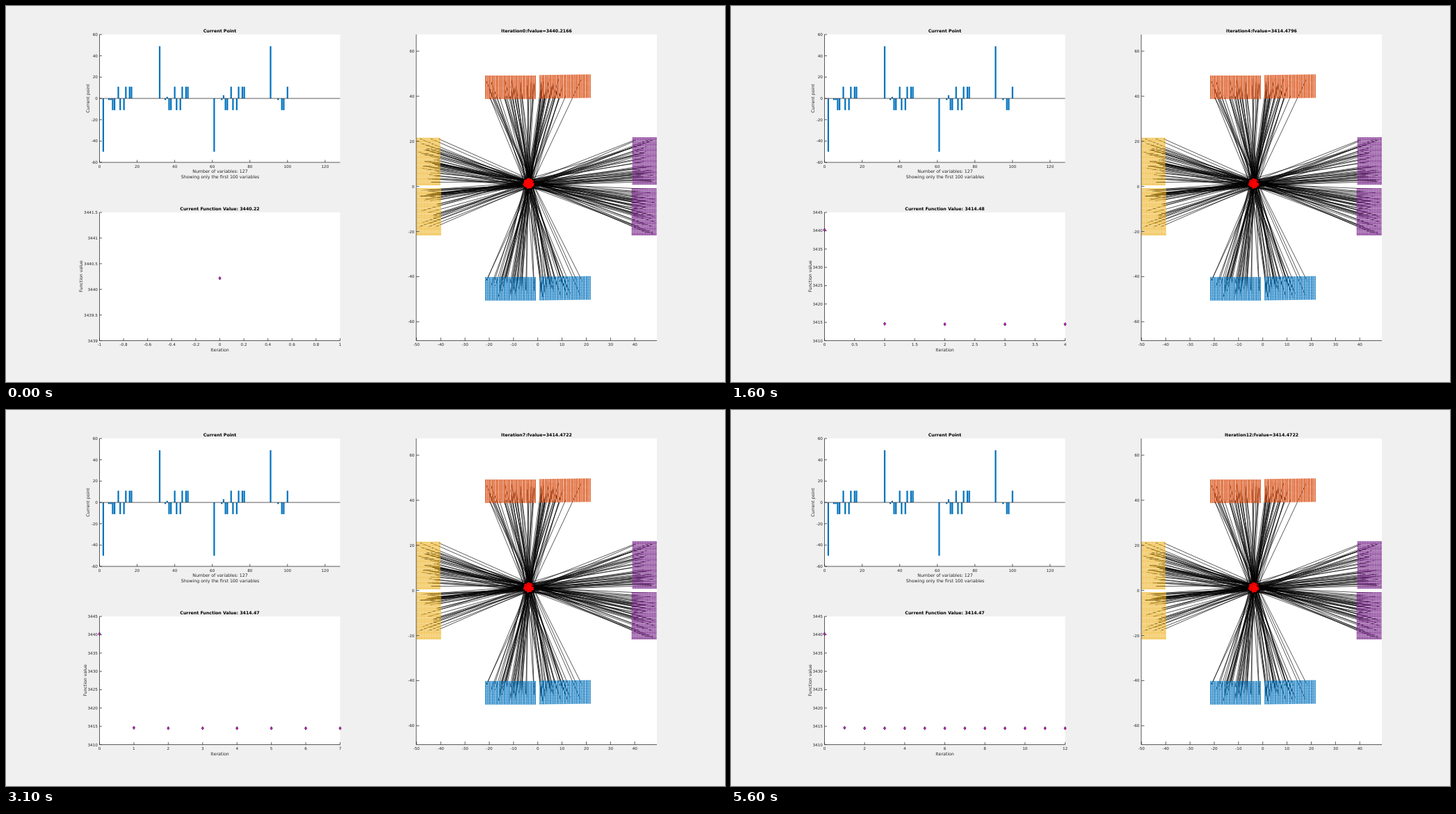
Recreate the animation shown at these times as an HTML page with a canvas. Size 1034 by 541 pixels, loop 6.6 s.

```html
<!DOCTYPE html>
<html>
<head>
<meta charset="utf-8">
<style>
html, body { margin: 0; width: 100%; height: 100%; overflow: hidden; background: #f0f0f0; }
canvas { display: block; }
</style>
</head>
<body>
<canvas id="stage" width="1034" height="541"></canvas>
<script>
const ctx = document.getElementById('stage').getContext('2d');
const LOOP = 6600, INK = '#262626';
const BLUE = '#0072bd', ORANGE = '#d95319', YELLOW = '#edb120', PURPLE = '#7e2f8e';
const CORE = { x: -3.8, y: 1.3, radius: 2.1 };

// detector blocks: colour, x range, y range, tilt, strips run upright?, dot step
const blocks = [
  [ORANGE, -21.4, -1.1, 39, 49, 0, true, .33],
  [ORANGE, 1, 21.5, 39.2, 49.2, .3, true, .33],
  [BLUE, -21.4, -1.1, -50.4, -40.4, 0, true, .42],
  [BLUE, 1, 21.5, -50.3, -40.3, .3, true, .42],
  [YELLOW, -50.1, -40.4, .8, 21.3, 0, false, .5],
  [YELLOW, -49.8, -40.1, -21.4, -1.1, 0, false, .5],
  [PURPLE, 39.2, 49.1, 1.1, 21.5, 0, false, .4],
  [PURPLE, 38.9, 48.8, -21.4, -1.1, 0, false, .4]
];

function random(seed) {
  return () => {
    seed = seed + 0x6d2b79f5 | 0;
    let t = Math.imul(seed ^ seed >>> 15, 1 | seed);
    t = t + Math.imul(t ^ t >>> 7, 61 | t) ^ t;
    return ((t ^ t >>> 14) >>> 0) / 4294967296;
  };
}

// straight rays through a disc, ending inside two opposite blocks
function makeRays(upright, count, spread, seed) {
  const rnd = random(seed), rays = [];
  const depth = () => 9 * rnd();
  const hits = v => Math.abs(v) > 1.1 && Math.abs(v) < 21.3;
  while (rays.length < count) {
    const r = spread * Math.sqrt(rnd()), a = rnd() * 2 * Math.PI;
    const x = CORE.x + r * Math.cos(a), y = CORE.y + r * Math.sin(a);
    const slope = Math.tan((rnd() - .5) * 1.08);
    const u = upright ? y : x, v = upright ? x : y;
    const u1 = -40.3 - depth(), u2 = 39.2 + depth();
    const v1 = v + (u1 - u) * slope, v2 = v + (u2 - u) * slope;
    if (!hits(v1) || !hits(v2)) continue;
    rays.push({ x, y, r, line: upright ? [v1, u1, v2, u2] : [u1, v1, u2, v2] });
  }
  return rays;
}
const fewRays = [...makeRays(true, 66, 2.1, 11), ...makeRays(false, 82, 2.1, 29)];
const manyRays = [...makeRays(true, 450, 3.4, 5), ...makeRays(false, 450, 3.4, 8)];

function text(str, x, y, { size = 6.25, bold = false, align = 'center', color = INK } = {}) {
  ctx.font = `${bold ? 'bold ' : ''}${size}px "DejaVu Sans", sans-serif`;
  ctx.textAlign = align;
  ctx.fillStyle = color;
  ctx.fillText(str, x, y + size * .36);
}
const title = (str, x, y) => text(str, x, y, { bold: true, color: '#000' });

function sideText(str, x, y) {
  ctx.save();
  ctx.translate(x, y);
  ctx.rotate(-Math.PI / 2);
  text(str, 0, 0);
  ctx.restore();
}

function segment(x1, y1, x2, y2) {
  ctx.moveTo(x1, y1);
  ctx.lineTo(x2, y2);
}

function range(from, to, step) {
  const n = Math.round((to - from) / step);
  return Array.from({ length: n + 1 }, (_, i) => +(from + i * step).toFixed(2));
}

function paper(a) {
  ctx.fillStyle = '#fff';
  ctx.fillRect(a.left, a.top, a.right - a.left, a.bottom - a.top);
}

function frame(a, xs, ys) {
  const { left, right, top, bottom, X, Y } = a;
  const tick = .01 * Math.max(right - left, bottom - top);
  ctx.beginPath();
  segment(left, top, left, bottom);
  segment(left, bottom, right, bottom);
  for (const x of xs) segment(X(x), bottom, X(x), bottom - tick);
  for (const y of ys) segment(left, Y(y), left + tick, Y(y));
  ctx.strokeStyle = INK;
  ctx.lineWidth = .75;
  ctx.stroke();
  for (const x of xs) text(x, X(x), bottom + 5.6, { size: 5.68 });
  for (const y of ys) text(y, left - 2.6, Y(y), { size: 5.68, align: 'right' });
}

function axes(left, right, top, bottom, x0, x1, y0, y1) {
  return {
    left, right, top, bottom,
    X: x => left + (x - x0) / (x1 - x0) * (right - left),
    Y: y => bottom - (y - y0) / (y1 - y0) * (bottom - top)
  };
}

function drawBars() {
  const a = axes(134.5, 480.5, 41, 225, 0, 128, -60, 60);
  const bars = [[2, -50], [32, 49], [61, -50], [91, 49], [95, -1.5], [97, -11], [98, -11], [100, 11]];
  const group = [[5, -1.5], [6, -1.5], [7, -11], [8, -11], [10, 11], [11, -11], [13, -11], [14, 11], [16, 11], [17, 11]];
  [0, 30, 60].forEach((base, k) => {
    for (const [i, v] of group) bars.push([base + i, i === 6 ? [-1.5, 1.5, 3][k] : v]);
  });
  paper(a);
  ctx.fillStyle = BLUE;
  for (const [i, v] of bars) ctx.fillRect(a.X(i) - 1.1, a.Y(Math.max(v, 0)), 2.2, Math.abs(v) * 184 / 120);
  frame(a, range(0, 120, 20), range(-60, 60, 20));
  ctx.beginPath();
  segment(a.left, a.Y(0), a.right, a.Y(0));
  ctx.stroke();
  title('Current Point', 307.5, 35.8);
  sideText('Current point', 118, 133);
  text('Number of variables: 127', 308, 238);
  text('Showing only the first 100 variables', 308, 245.4);
}

function valueAt(i) {
  if (i === 0) return 3440.2166;
  if (i === 1) return 3414.6;
  if (i === 2) return 3414.4797;
  if (i < 5) return 3414.4796;
  return i === 5 ? 3414.4723 : 3414.4722;
}

function drawHistory(n) {
  const first = n === 0, end = n === 11 ? 12 : n;
  const [x0, x1] = first ? [-1, 1] : [0, end];
  const [y0, y1] = first ? [3439, 3441.5] : [3410, 3445];
  const step = end < 3 ? .2 : end < 6 ? .5 : end < 11 ? 1 : 2;
  const a = axes(134.5, 480.5, 297, 481.5, x0, x1, y0, y1);
  paper(a);
  frame(a, range(x0, x1, step), range(y0, y1, first ? .5 : 5));
  title('Current Function Value: ' + valueAt(n).toFixed(2), 307.5, 292);
  sideText('Function value', first ? 108 : 113.5, 389);
  text('Iteration', 307.5, 494.5);
  ctx.fillStyle = '#f0f';
  ctx.strokeStyle = '#000';
  ctx.lineWidth = .65;
  for (let i = 0; i <= n; i++) {
    const x = a.X(i), y = a.Y(valueAt(i));
    ctx.beginPath();
    ctx.moveTo(x, y - 2.3);
    ctx.lineTo(x + 1.6, y);
    ctx.lineTo(x, y + 2.3);
    ctx.lineTo(x - 1.6, y);
    ctx.closePath();
    ctx.fill();
    ctx.stroke();
  }
}

function drawBlock([color, x0, x1, y0, y1, tilt, upright, step], { X, Y }, size) {
  const strips = 30, dots = Math.round(10 / step);
  ctx.fillStyle = color;
  for (let i = 0; i < strips; i++) {
    for (let j = 0; j <= dots; j++) {
      const s = i / (strips - 1), d = j / dots;
      const u = upright ? s : d, v = upright ? d : s;
      const x = X(x0 + (x1 - x0) * u), y = Y(y0 + (y1 - y0) * v + tilt * u);
      ctx.fillRect(x - size / 2, y - size / 2, size, size);
    }
  }
}

function drawScene(a, rays, width, dot, red) {
  const { X, Y } = a;
  paper(a);
  ctx.save();
  ctx.beginPath();
  ctx.rect(a.left, a.top, a.right - a.left, a.bottom - a.top);
  ctx.clip();
  ctx.strokeStyle = '#000';
  ctx.lineWidth = width;
  // stroked one by one so that overlaps darken
  for (const { line: [x1, y1, x2, y2] } of rays) {
    ctx.beginPath();
    segment(X(x1), Y(y1), X(x2), Y(y2));
    ctx.stroke();
  }
  for (const b of blocks) drawBlock(b, a, dot);
  ctx.fillStyle = '#f00';
  for (const { x, y, r } of rays) {
    if (r > CORE.radius) continue;
    ctx.beginPath();
    ctx.arc(X(x), Y(y), red, 0, 7);
    ctx.fill();
  }
  ctx.restore();
}

function drawOverview() {
  const a = axes(162.5, 908, 41, 481.5, -84.72, 83.75, -50.4, 49.2);
  drawScene(a, manyRays, .65, 1.5, .65);
  frame(a, range(-80, 80, 20), range(-50, 40, 10));
  title('line3', 535.5, 35.5);
}

function drawIteration(n) {
  drawBars();
  drawHistory(n);
  const a = axes(590, 936, 41, 481.5, -50.1, 49.1, -68.4, 67.4);
  drawScene(a, fewRays, .65, 1.55, n ? .9 : 1.2);
  frame(a, range(-50, 40, 10), range(-60, 60, 20));
  title(`Iteration${n}:fvalue=${valueAt(n).toFixed(4)}`, 763, 35.8);
}

function draw(n) {
  ctx.fillStyle = '#f0f0f0';
  ctx.fillRect(0, 0, 1034, 541);
  ctx.textRendering = 'geometricPrecision';
  if (n === 1) drawOverview();
  else drawIteration(n);
}

let shown = -1;
function tick() {
  const t = performance.now() % LOOP;
  const n = t < 100 ? 0 : Math.min(12, 1 + Math.floor((t - 100) / 500));
  if (n !== shown) draw(shown = n);
  requestAnimationFrame(tick);
}
tick();
</script>
</body>
</html>
```
